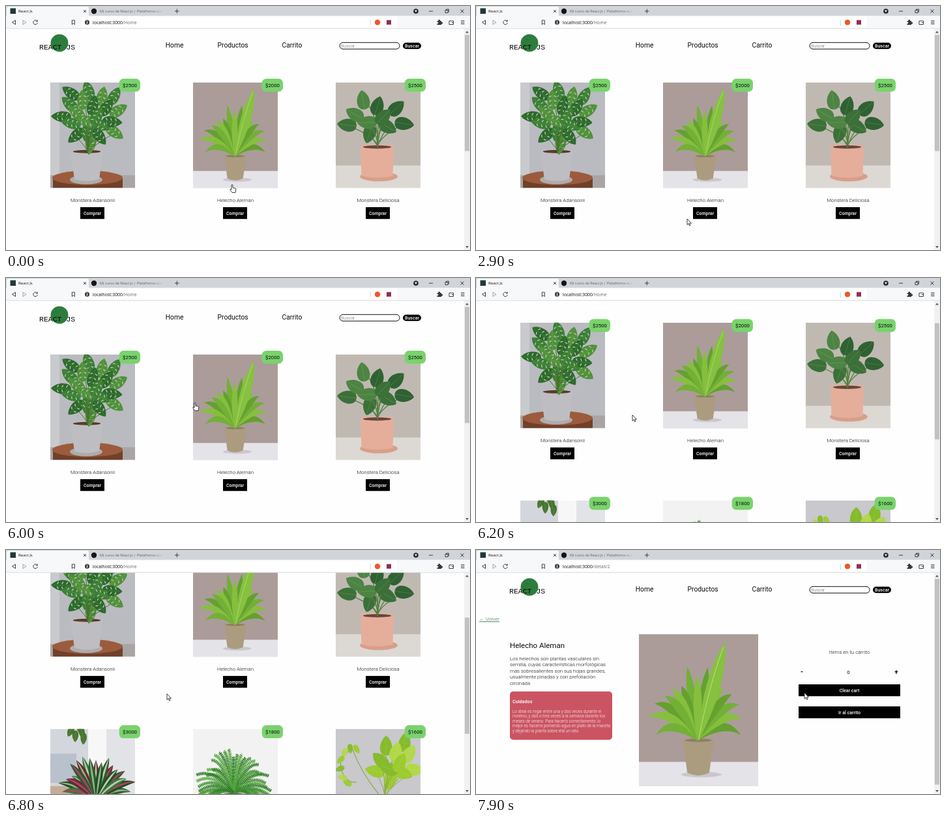
An HTML page that plays this animation: 712 px wide and 376 px high, repeating every 8000 ms.

```html
<!DOCTYPE html>
<html lang="es">
<head>
<meta charset="utf-8">
<title>React Js</title>
<style>
html, body { margin: 0; width: 100%; height: 100%; overflow: hidden; background: #fff; }
svg { display: block; }
#stage { width: 100vw; height: 100vh; }
text { font-family: Roboto, sans-serif; font-size: 7.8px; fill: #0a0a0a; white-space: pre; }
.ui { font-family: "Open Sans", sans-serif; font-size: 6.1px; }
.idle { font-size: 5.5px; fill: url(#fade); }
.url { font-size: 6.8px; }
.light { font-weight: 300; }
.mid { text-anchor: middle; }
.nav { font-size: 10.3px; }
.btn { font-size: 7px; font-weight: 500; fill: #fff; text-anchor: middle; }
.title { font-size: 11.5px; }
.sign { font-size: 10px; font-weight: 700; text-anchor: middle; }
.hint { font-size: 7px; font-weight: 300; fill: #666; }
.back { font-weight: 300; fill: #2f6f45; text-decoration: underline; }
.head { font-size: 7.2px; font-weight: 500; fill: #fff; }
.care { font-size: 6.35px; font-weight: 300; fill: #fff; }
.logo { font-family: "Liberation Mono", monospace; font-size: 11.5px; }
.icon { fill: none; stroke: #3c3f43; stroke-width: 1; }
</style>
</head>
<body>
<svg id="stage" viewBox="0 0 712 376" preserveAspectRatio="none"></svg>
<script>
const LOOP = 8000, STEP = 100, DETAIL_AT = 7300;
const GRID = { x: 68, y: 117.7, dx: 219, dy: 274, w: 130, h: 162.5 };

// ---------- drawing helpers ----------
const text = (x, y, str, cls = '') => `<text x="${x}" y="${y}" class="${cls}">${str}</text>`;
const lines = (x, y, pitch, cls, rows) => rows.map((row, i) => text(x, y + i * pitch, row, cls)).join('');
const rect = (x, y, w, h, fill, rx = 0) => `<rect x="${x}" y="${y}" width="${w}" height="${h}" fill="${fill}" rx="${rx}"/>`;
const disc = (x, y, rx, ry, fill) => `<ellipse cx="${x}" cy="${y}" rx="${rx}" ry="${ry}" fill="${fill}"/>`;
const shape = (d, fill) => `<path d="${d}" fill="${fill}"/>`;
const line = (d, stroke, width, dash = 'none') =>
  `<path d="${d}" fill="none" stroke="${stroke}" stroke-width="${width}" stroke-dasharray="${dash}"/>`;
const button = (x, y, w, h, label, rx) => rect(x, y, w, h, '#000', rx) + text(x + w / 2, y + h / 2 + 2.5, label, 'btn');
const photo = (art, x, y, w, h) =>
  `<svg x="${x}" y="${y}" width="${w}" height="${h}" viewBox="0 0 130 162.5" preserveAspectRatio="none">${art}</svg>`;

const repeat = (n, fn) => Array.from({ length: n }, (_, i) => fn(i)).join('');
const pick = (colors, i) => colors[i % colors.length];
const rand = i => { const v = Math.sin(i * 12.9898 + 4.1) * 43758.5453; return v - Math.floor(v); };

// ---------- plant parts ----------
const backdrop = (wall, table, edge) => rect(0, 0, 130, 163, wall) + rect(0, edge, 130, 163 - edge, table);

// Tapered pot with a rim and soil.
const pot = (x, top, bottom, rTop, rBase, fill, soil) =>
  shape(`M${x - rTop} ${top}H${x + rTop}L${x + rBase} ${bottom}Q${x} ${bottom + 6} ${x - rBase} ${bottom}Z`, fill) +
  disc(x, top, rTop, rTop * .15, fill) + disc(x, top + .5, rTop * .85, rTop * .1, soil);

// Broad pointed leaf centred on a point, with a midrib.
const leaf = (x, y, angle, len, wide, fill, inside = '') => {
  const h = len / 2, w = len * wide;
  return `<g transform="translate(${x} ${y}) rotate(${angle})">` +
    shape(`M${-h} 0C${-h} ${-w} ${h * .4} ${-w} ${h} 0C${h * .4} ${w} ${-h} ${w} ${-h} 0`, fill) +
    line(`M${-h} 0H${h * .8}`, '#c9e0a055', .5) + inside + '</g>';
};

// Leaves on a golden-angle spiral, outermost first, pointing away from the root and drooping.
const cluster = (n, { x, y, rx, ry, root }, draw) => repeat(n, k => {
  const i = n - 1 - k, r = Math.sqrt((i + .5) / n), a = i * 2.39996;
  const lx = x + rx * r * Math.cos(a), ly = y + ry * r * Math.sin(a);
  const angle = Math.atan2(ly - root + 32, lx - x) * 180 / Math.PI + (rand(i) - .5) * 40;
  return draw(lx, ly, angle, i);
});

// Long blade from root to tip; a positive arch lifts its middle.
const blade = (x0, y0, x1, y1, arch, w, fill) => {
  const dx = x1 - x0, dy = y1 - y0, len = Math.hypot(dx, dy), nx = -dy / len * w, ny = dx / len * w;
  const mx = x0 + dx * .6, my = y0 + dy * .6 - arch;
  return shape(`M${x0} ${y0}Q${mx + nx} ${my + ny} ${x1} ${y1}Q${mx - nx} ${my - ny} ${x0} ${y0}`, fill);
};

// Tips spread over an arc around the root, in shuffled order; step and n share no factor.
const fan = (n, step, from, to, rx, ry, draw) => repeat(n, i => {
  const a = (from + (to - from) * ((i * step) % n) / (n - 1)) * Math.PI / 180, r = .72 + .28 * rand(i);
  return draw(rx * r * Math.cos(a), -ry * r * Math.sin(a), Math.abs(Math.cos(a)), i);
});

// ---------- plants ----------
function adansonii() {
  const slits = repeat(6, i => {
    const side = i % 2 ? 1 : -1, x = (i >> 1) * 7 - 8;
    return line(`M${x} ${side * 2}l-2 ${side * 3.5}`, '#b4c0ae', 1.5);
  });
  return backdrop('#b9bbc0', '#a9a5a4', 143) + rect(0, 0, 14, 143, '#c9cacd') +
    rect(4, 147, 107, 16, '#70402a') + disc(57, 147, 54, 11, '#9c5b3c') + disc(55, 150, 25, 7, '#adacae') +
    pot(56, 106, 149, 25, 19, '#bebec2', '#5a3c28') +
    cluster(21, { x: 64, y: 51, rx: 52, ry: 46, root: 95 }, (x, y, a, i) =>
      line(`M57 106Q60 ${y + 25} ${x} ${y}`, '#45702f', 1) +
      leaf(x, y, a, 31, .36, pick(['#3a7f33', '#4f9139', '#2b6a2a'], i), slits));
}

function helechoAleman() {
  return backdrop('#ab9c9a', '#e4e3e8', 136.5) + disc(68, 150, 22, 3, '#c9c7cb') +
    pot(64.7, 113, 148, 17, 12, '#ab9c80', '#8c7e64') +
    fan(15, 4, 5, 175, 57, 86, (dx, dy, flat, i) =>
      blade(64, 114, 64 + dx, 114 + dy, 22 * flat, 9, pick(['#64a12f', '#86bf3e', '#72b036'], i))) +
    blade(65, 114, 94, 9, 0, 15, '#86c13f') + line('M65 113Q75 60 92 14', '#b5dc73', .8);
}

function deliciosa() {
  return backdrop('#c0b9b2', '#dcd8d4', 128) + disc(66, 145, 29, 7.5, '#d99e8a') +
    pot(63.5, 99, 144, 25.5, 24, '#e5ae9b', '#63473a') +
    cluster(10, { x: 62, y: 53, rx: 50, ry: 34, root: 95 }, (x, y, a, i) =>
      line(`M64 100Q66 ${y + 20} ${x} ${y}`, '#517f3e', 1.3) +
      leaf(x, y, a, 30, .44, pick(['#3b7038', '#4d8444', '#2f6232'], i)));
}

function calathea() {
  return backdrop('#e2e3e6', '#e2e0df', 140) + rect(0, 0, 58, 90, '#d3d7dd') + rect(0, 38, 40, 45, '#b9c1cc') +
    rect(0, 88, 58, 75, '#c4ad96') + rect(58, 0, 28, 163, '#f7f7f8') +
    cluster(5, { x: 44, y: 6, rx: 14, ry: 14, root: 0 }, (x, y, a) => leaf(x, y, a, 18, .35, '#47752f')) +
    rect(22, 138, 80, 9, '#ecdcc8') + rect(28, 147, 9, 16, '#dcc5ab') + rect(88, 147, 9, 16, '#dcc5ab') +
    disc(70, 140, 21, 4, '#8f8b86') + pot(69.5, 108, 139, 18.5, 14, '#a7a199', '#4a3b35') +
    fan(17, 5, 12, 168, 66, 76, (dx, dy, flat, i) => {
      const at = [70, 110, 70 + dx, 110 + dy, 14 * flat];
      return blade(...at, 10, pick(['#2c5b33', '#6d2438', '#3d7340', '#234b2b'], i)) +
        blade(...at, 3, pick(['#8fb57b', '#a8465c', '#b9cfa6'], i));
    });
}

function helecho() {
  return backdrop('#f2f2f2', '#f7f7f7', 136) + disc(65, 134, 24, 3, '#dedddc') +
    pot(62, 100, 131, 16, 12, '#a99f96', '#5b5045') +
    fan(39, 11, -38, 218, 68, 72, (dx, dy, flat, i) => {
      const d = `M62 98Q${62 + dx * .55} ${84 + Math.min(dy, 0) * .7} ${62 + dx} ${98 + dy + 8 * flat}`;
      const green = pick(['#3f8f30', '#57a83f', '#2f7a29'], i);
      return line(d, green, 1) + line(d, green, 5, '1.6 .9');
    });
}

function potus() {
  const greens = ['#9ccb31', '#86bb2d', '#b2d84a'];
  const vine = repeat(7, i => {
    const a = Math.PI * (1.6 - i * .16), x = 26 + 20 * Math.cos(a), y = 58 - 28 * Math.sin(a) * -1;
    return leaf(x, y, 60 + i * 25, 15, .36, pick(greens, i));
  });
  const facets = repeat(6, i => {
    const x = 43 + i * 10.7, base = 52 + i * 8;
    return shape(`M${x} 107L${x + 5} 103L${x + 10.7} 107L${base + 4} 157Z`, pick(['#efeef0', '#dcdbde'], i)) +
      shape(`M${base} 157L${base + 4} 128L${base + 8} 157Z`, '#d2d1d5');
  });
  return backdrop('#c8c8cd', '#b6b4b8', 137) +
    line('M72 108Q40 70 26 32Q4 40 8 60Q14 84 32 82', '#8cae3c', 1.2) + vine +
    cluster(11, { x: 91, y: 52, rx: 36, ry: 36, root: 98 }, (x, y, a, i) =>
      line(`M74 108Q78 ${y + 30} ${x} ${y}`, '#8cae3c', 1) + leaf(x, y, a, 31, .4, pick(greens, i))) +
    shape('M43 107H107L100 157H51Z', '#e3e2e5') + facets;
}

// ---------- pages ----------
const products = [
  ['Monstera Adansonii', 2500, adansonii], ['Helecho Aleman', 2000, helechoAleman],
  ['Monstera Deliciosa', 2500, deliciosa], ['Calathea Stromanthe', 3000, calathea],
  ['Helecho', 1800, helecho], ['Potus Lemon', 1600, potus]];

const card = ([name, price, art], i) => {
  const x = GRID.x + GRID.dx * (i % 3), y = GRID.y + GRID.dy * Math.floor(i / 3);
  return photo(art(), x, y, GRID.w, GRID.h) +
    rect(x + 105.7, y - 5.7, 32.3, 20, '#79d36c', 6.5) + text(x + 122, y + 7.2, '$' + price, 'mid') +
    text(x + 65, y + 184, name, 'light mid') + button(x + 46, y + 192.3, 37, 18.2, 'Comprar');
};

const header = disc(82, 57, 13.5, 13.5, '#2c7d3d') + text(51, 66.5, 'REACT JS', 'logo') +
  text(244.7, 64, 'Home', 'nav') + text(324.5, 64, 'Productos', 'nav') + text(423.5, 64, 'Carrito', 'nav') +
  `<rect x="512" y="56.3" width="92" height="10" rx="5" fill="#fff" stroke="#111"/>` +
  text(514, 64, 'Buscar', 'hint') + button(609, 56.5, 28, 9.8, 'Buscar', 4.9);

const home = header + products.map(card).join('');

const detail = header + text(5, 109, '← Volver', 'back') + text(52, 150.5, 'Helecho Aleman', 'title') +
  lines(52, 170, 9.4, 'light', ['Los helechos son plantas vasculares sin', 'semilla, cuyas características morfológicas',
    'más sobresalientes son sus hojas grandes,', 'usualmente pinadas y con prefoliación', 'circinada']) +
  rect(52, 218, 157, 74.5, '#cb5462', 5) + text(56, 236, 'Cuidados', 'head') +
  lines(56, 251, 7.4, 'care', ['Lo ideal es regar entre una y dos veces durante el', 'invierno, y dos o tres veces a la semana durante los',
    'meses de verano. Para hacerlo correctamente, lo', 'mejor es hacerlo poniendo agua en plato de la maceta', 'y dejando la planta sobre ella un rato.']) +
  photo(helechoAleman(), 250, 129.5, 183, 234.5) + text(573, 160, 'Items en tu carrito', 'light mid') +
  text(500, 191, '-', 'sign') + text(571.5, 191, '0', 'mid') + text(645, 191.5, '+', 'sign') +
  button(495, 207, 156, 18.3, 'Clear cart') + button(495, 241, 156, 18.3, 'Ir al carrito');

const cross = (x, y, r) => `M${x - r} ${y - r}l${2 * r} ${2 * r}M${x + r} ${y - r}l${-2 * r} ${2 * r}`;
const chrome = rect(0, 0, 712, 16, '#d1d4d8') + rect(0, 15, 712, 20, '#f7f8f9') + rect(116, 17, 484, 16, '#fff', 2) +
  shape('M1 16V3Q1 1 3 1H125Q127 1 127 3V16Z', '#f7f8f9') + rect(0, 34.5, 712, .7, '#cfd1d4') +
  rect(6.5, 3.5, 8.5, 8.5, '#20383a') + text(19, 10.2, 'React Js', 'ui') + disc(135, 8, 4.2, 4.2, '#151515') +
  text(144, 10, 'Mi curso de React.Js | Plataforma eLe', 'ui idle') +
  `<g class="icon"><path d="${cross(121, 8, 2)}M259 8h6.5M262.3 4.7v6.5M649 8h6M674 6.5h4v4h-4zM675.5 6.5v-1.5h4v4h-1.5${cross(700, 8, 2.6)}"/>
  <path d="M14.5 22L9.5 25.2L14.5 28.5Z"/><path d="M26 22L31 25.2L26 28.5Z" opacity=".45"/>
  <path d="M47.5 23A3.3 3.3 0 1 0 48.3 26M48.3 21.3v2.5h-2.5M101.3 22h4v6.5l-2-1.8l-2 1.8z"/>
  <path d="M680 23h6.5v5.5h-6.5zM684 25.5h2.5M698 22.8h5.5M698 25.2h5.5M698 27.6h5.5"/></g>` +
  disc(629, 8, 3.8, 3.8, '#222') + shape('M627 6.6h4L629 10Z', '#fff') +
  disc(124.5, 25.2, 3.6, 3.6, '#44474b') + rect(124, 24.5, 1, 2.8, '#fff') + rect(124, 22.8, 1, 1, '#fff') +
  rect(558.8, 21, .7, 9, '#bbb') + disc(570, 25.2, 4.2, 4.2, '#f0562b') + rect(584, 21.7, 7, 7, '#8f2f52') +
  shape('M661.5 23h2a1.4 1.4 0 1 1 2.6 0h2v2a1.4 1.4 0 1 1 0 2.4v1.6h-6.6v-2a1.3 1.3 0 1 0 0-2.3z', '#33363a') +
  text(133, 27.7, 'localhost:3000<tspan id="path" fill="#62666b">/Home</tspan>', 'ui url');

document.getElementById('stage').innerHTML =
  `<defs><linearGradient id="fade"><stop offset=".85" stop-color="#5d6166"/><stop offset="1" stop-color="#5d6166" stop-opacity=".15"/></linearGradient></defs>
  <rect width="712" height="376" fill="#fefefe"/>
  <g id="home">${home}</g><g id="detail">${detail}</g>
  ${rect(703, 35, 9, 341, '#f1f1f1')}${shape('M705 41.5l2.5-3l2.5 3zM705 370l2.5 3l2.5-3z', '#555')}
  <rect id="thumb" x="704" width="7" fill="#c1c1c1"/>
  ${chrome}
  <g id="cursor" fill="#fff" stroke="#111" stroke-width=".8" stroke-linejoin="round">
    <path id="arrow" d="M0 0V9.2L2.1 7.3L3.5 10.5L5 9.9L3.6 6.8H6.4Z"/>
    <path id="hand" d="M-1 1Q0-.8 1 1V5L5.2 6Q6 6.3 5.8 8L5 12.5H0L-3 8.5Q-3.5 7-2 7.2L-1 8Z"/>
  </g>`;

// ---------- motion ----------
const START = { x: 347, y: 275 };
// Each move eases to x, y; sideX and sideY bow its path.
const moves = [
  { from: 1800, to: 2600, x: 324, y: 328, sideX: 0, sideY: 30 },
  { from: 5100, to: 6000, x: 290, y: 192, sideX: 68, sideY: 0 },
  { from: 6000, to: 6200, x: 240, y: 211, sideX: 0, sideY: 0 },
  { from: 6700, to: 7300, x: 345, y: 205, sideX: 0, sideY: 22 },
  { from: 7300, to: 7900, x: 504, y: 220, sideX: 0, sideY: 0 }];

const progress = (t, from, to) => Math.min(1, Math.max(0, (t - from) / (to - from)));
const ease = p => (1 - Math.cos(Math.PI * p)) / 2;

const cursorAt = t => moves.reduce((pos, m) => {
  const p = progress(t, m.from, m.to), k = ease(p), bow = Math.sin(Math.PI * p);
  return { x: pos.x + (m.x - pos.x) * k + m.sideX * bow, y: pos.y + (m.y - pos.y) * k + m.sideY * bow };
}, START);
const scrollAt = t => 208 * (ease(progress(t, 6010, 6600)) - ease(progress(t, 6610, 7020)));

const el = id => document.getElementById(id);
const show = (id, on) => el(id).setAttribute('visibility', on ? 'visible' : 'hidden');

function draw(now) {
  const t = Math.floor((now % LOOP) / STEP) * STEP;
  const { x, y } = cursorAt(t), scroll = scrollAt(t), inDetail = t >= DETAIL_AT;
  const onPhoto = !inDetail && (x - GRID.x + GRID.dx) % GRID.dx <= GRID.w &&
    (y + scroll - GRID.y + GRID.dy) % GRID.dy <= GRID.h;
  show('home', !inDetail);
  show('detail', inDetail);
  show('arrow', !onPhoto);
  show('hand', onPhoto);
  el('home').setAttribute('transform', `translate(0 ${-scroll})`);
  el('cursor').setAttribute('transform', `translate(${x} ${y})`);
  el('thumb').setAttribute('y', 44.5 + scroll * .515);
  el('thumb').setAttribute('height', inDetail ? 317 : 179);
  el('path').textContent = inDetail ? '/detail/2' : '/Home';
  requestAnimationFrame(draw);
}
draw(performance.now());
</script>
</body>
</html>
```
